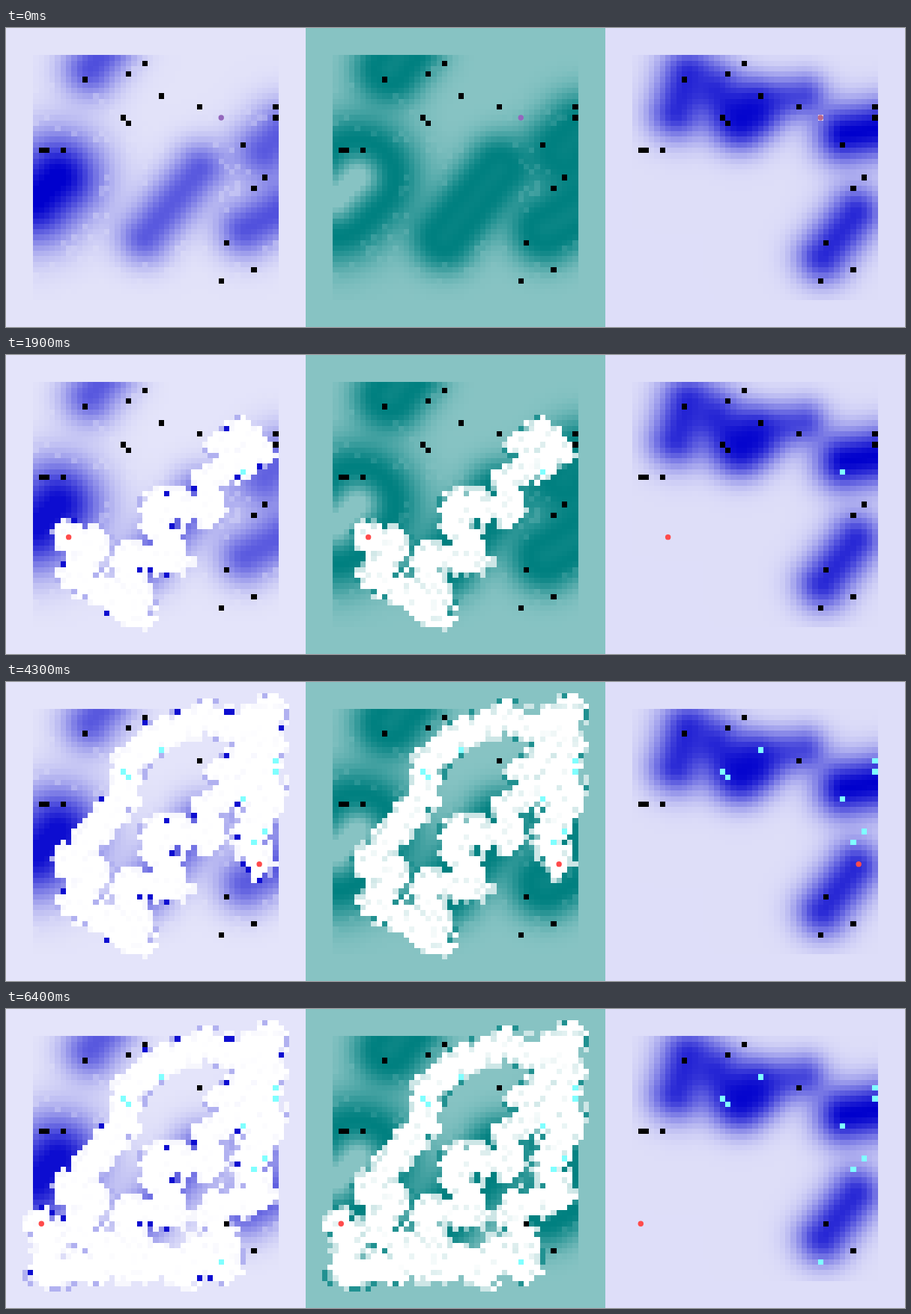
Recreate the animation shown at these times as an HTML page with a canvas. Size 1200 by 400 pixels, loop 6.5 s.

```html
<!DOCTYPE html>
<html lang="en">
<head>
<meta charset="utf-8">
<title>Search path over a belief map</title>
<style>
html, body { margin: 0; width: 100%; height: 100%; overflow: hidden; }
canvas { display: block; width: 1200px; height: 400px; }
</style>
</head>
<body>
<canvas id="stage" width="1200" height="400"></canvas>
<script>
const ctx = document.getElementById('stage').getContext('2d');
const N = 55, PANEL = 400, STEP = 100, FRAMES = 65, SUBSTEPS = 10;
const LO = 5, HI = 50, RANGE = 3.5;
const BLUE = [0, 0, 205], TEAL = [0, 128, 128];

// The agent covers each leg at constant speed, arriving at step `end`
const home = [39, 16];
const legs = [
  { end: 8, via: [[43, 14], [46, 17], [36, 23], [37, 28], [27, 27], [27, 30]] },
  { end: 19, via: [[31, 37], [21, 37], [24, 47], [12, 40], [16, 34], [11, 33]] },
  { end: 29, via: [[16, 27], [21, 21], [22, 14], [28, 9], [37, 6]] },
  { end: 37, via: [[48, 11], [45, 6], [48, 5], [47, 11]] },
  { end: 48, via: [[48, 21], [44, 27], [46, 34], [37, 36], [40, 44]] },
  { end: 64, via: [[40, 47], [34, 44], [33, 48], [28, 46], [6, 48], [8, 43], [6, 39]] }
];

const detectable = [
  [28, 12], [21, 16], [22, 17], [49, 14], [49, 16],
  [43, 21], [47, 27], [45, 29], [39, 46]
];
const missed = [
  [14, 9], [25, 6], [22, 8], [35, 14], [6, 22], [7, 22], [10, 22], [40, 39], [45, 44]
];

// Soft ridges from one cell to another
const ridge = (from, to, spread, amp) => ({ from, to, spread, amp });
const beliefRidges = [
  ridge([5, 31], [9, 27], 5.7, .92),
  ridge([15, 7], [18, 3], 3.7, .58),
  ridge([25, 38], [35, 25.5], 3.5, .54),
  ridge([47, 22], [50, 19], 4.2, .54),
  ridge([43.5, 36.5], [50, 33], 3.7, .57)
];
const truthRidges = [
  ridge([14.5, 8], [12.5, 15], 3.6, .8),
  ridge([20, 11], [24, 16], 3.6, .76),
  ridge([24.5, 16], [26, 15], 3.5, .9),
  ridge([29, 13], [36, 12], 3, .68),
  ridge([43.5, 19], [50, 18], 3.8, 1),
  ridge([45.5, 33.5], [39.5, 41.5], 3.5, .82)
];

function hash(c, r, k) {
  const s = Math.sin(c * 127.1 + r * 311.7 + k * 74.7) * 43758.5453;
  return s - Math.floor(s);
}

const lerp = (a, b, u) => a + (b - a) * u;
const mix = (p, q, u) => [lerp(p[0], q[0], u), lerp(p[1], q[1], u)];
const dist = (p, q) => Math.hypot(q[0] - p[0], q[1] - p[1]);

function glow(p, { from, to, spread, amp }) {
  const [dx, dy] = [to[0] - from[0], to[1] - from[1]];
  const along = ((p[0] - from[0]) * dx + (p[1] - from[1]) * dy) / (dx * dx + dy * dy);
  const d = dist(p, mix(from, to, Math.max(0, Math.min(1, along))));
  return amp * Math.exp(-d * d / (2 * spread * spread));
}

function makeField(ridges, floor, top) {
  return Float32Array.from({ length: N * N }, (_, i) => {
    const c = i % N, r = Math.floor(i / N);
    if (Math.min(c, r) < LO || Math.max(c, r) >= HI) return floor;
    const rest = ridges.reduce((m, g) => m * Math.max(0, 1 - glow([c, r], g)), 1);
    return Math.min(top, lerp(1, floor, rest));
  });
}

const truth = makeField(truthRidges, .13, 1);
// A few cells of the belief map are slightly fainter
const belief = makeField(beliefRidges, .1, .9).map((v, i) =>
  hash(i % N, Math.floor(i / N), 5) < .08 && v < .4 ? lerp(.1, v, .7) : v);

function along(points, u) {
  const lengths = points.slice(1).map((p, i) => dist(points[i], p));
  let left = u * lengths.reduce((a, b) => a + b);
  for (let i = 0; i < lengths.length; i++) {
    if (left <= lengths[i]) return mix(points[i], points[i + 1], left / lengths[i]);
    left -= lengths[i];
  }
  return points[points.length - 1];
}

function agentAt(t) {
  let begin = 0, from = home;
  for (const { end, via } of legs) {
    if (t <= end) return along([from, ...via], (t - begin) / (end - begin));
    begin = end;
    from = via[via.length - 1];
  }
  return from;
}

// Smallest distance from each cell to the path so far, for every step
function trackDistances() {
  const near = new Float32Array(N * N).fill(N);
  const all = [near.slice()];
  for (let f = 1; f < FRAMES; f++) {
    for (let k = 0; k <= SUBSTEPS; k++) {
      const p = agentAt(f - 1 + k / SUBSTEPS);
      near.forEach((d, i) => {
        near[i] = Math.min(d, dist(p, [i % N, Math.floor(i / N)]));
      });
    }
    all.push(near.slice());
  }
  return all;
}
const distances = trackDistances();

// Belief after sensing: cleared near the path, noisy towards the sensor's range
function believed(f, i) {
  const d = distances[f][i];
  if (d > RANGE) return belief[i];
  const c = i % N, r = Math.floor(i / N);
  const reach = 2 + 1.5 * hash(c, r, 1), pick = hash(c, r, 2);
  if (d > 2 && pick > .965) return .9;
  if (d < reach) return pick < .15 ? .012 * d : 0;
  if (pick < .3) return .03;
  return pick < .5 ? .29 : belief[i];
}

const entropy = p => p <= 0 || p >= 1 ? 0
  : -(p * Math.log2(p) + (1 - p) * Math.log2(1 - p));

const tint = (v, full) =>
  `rgb(${full.map(k => Math.round(lerp(255, k, Math.min(1, v)))).join()})`;

function cell(panel, c, r, color) {
  const edge = k => Math.round(k * PANEL / N);
  ctx.fillStyle = color;
  ctx.fillRect(panel * PANEL + edge(c), edge(r), edge(c + 1) - edge(c), edge(r + 1) - edge(r));
}

function drawAgent(panel, c, r, color) {
  ctx.fillStyle = color;
  ctx.beginPath();
  ctx.arc(panel * PANEL + (c + .5) * PANEL / N, (r + .5) * PANEL / N, 3.7, 0, 2 * Math.PI);
  ctx.fill();
}

function draw(f) {
  const peak = f ? .95 : .9;
  for (let i = 0; i < N * N; i++) {
    const c = i % N, r = Math.floor(i / N), v = believed(f, i);
    cell(0, c, r, tint(v / peak, BLUE));
    cell(1, c, r, tint(entropy(v), TEAL));
    cell(2, c, r, tint(truth[i], BLUE));
  }
  const sensed = distances[Math.max(0, f - 1)];
  const [c, r] = agentAt(f).map(Math.round);
  for (let p = 0; p < 3; p++) {
    for (const [x, y] of missed) cell(p, x, y, '#000');
    for (const [x, y] of detectable) cell(p, x, y, sensed[y * N + x] < 3.1 ? '#80ffff' : '#000');
    if (!f && p === 2) cell(p, c, r, '#eadcee');
    drawAgent(p, c, r, f ? '#ff4b4b' : p === 2 ? '#b8688f' : '#9467bd');
  }
}

const start = performance.now();
let shown = -1;
function tick() {
  const f = Math.floor((performance.now() - start) / STEP) % FRAMES;
  if (f !== shown) draw(shown = f);
  requestAnimationFrame(tick);
}
tick();
</script>
</body>
</html>
```
